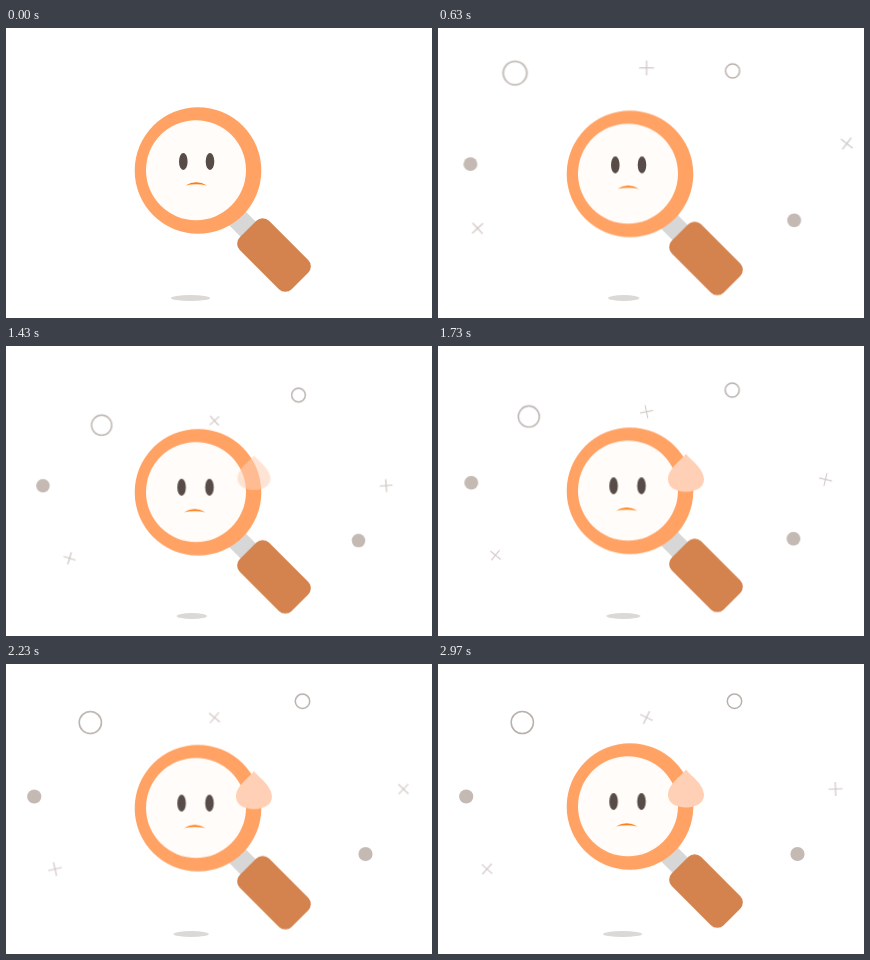
These frames come from a looping animation (426x290 px, 3.01 s). An HTML page:

```html
<!DOCTYPE html>
<html lang="en">
<head>
<meta charset="utf-8">
<title>Nothing found</title>
<style>
  :root { --loop: 3010ms; --smooth: cubic-bezier(.37, 0, .63, 1); }
  html, body { margin: 0; width: 100%; height: 100%; overflow: hidden; background: #fff; }
  svg { display: block; width: 100vw; height: 100vh; }

  /* three bobs per loop */
  .bob, .shadow {
    animation: bob calc(var(--loop) / 6) var(--smooth) infinite alternate;
  }
  .shadow { animation-name: shrink; transform-origin: 184.5px 270px; }
  @keyframes bob { to { transform: translateY(4px); } }
  @keyframes shrink { to { transform: translateX(1.4px) scaleX(.76); } }

  /* scenery bursts out from the floor, overshoots, dips and settles */
  .burst { animation: var(--loop) infinite; animation-timing-function: var(--smooth), linear; }
  .near { animation-name: near, appear; transform-origin: 208px 285px; }
  .far { animation-name: far, appear; transform-origin: 212.5px 286px; }
  @keyframes near {
    0%, 7.3% { transform: scale(0); }
    22.9% { transform: scale(1.1); }
    41% { transform: scale(.9); }
    75.3%, 100% { transform: scale(1); }
  }
  @keyframes far {
    0% { transform: scale(0); animation-timing-function: linear; }
    23.6% { transform: scale(1.1); }
    41% { transform: scale(.948); }
    75.3%, 100% { transform: scale(1); }
  }
  @keyframes appear {
    0%, 11% { opacity: 0; }
    17%, 100% { opacity: 1; }
  }

  .spin { animation: spin var(--loop) linear infinite; }
  .spin.late { animation-name: late; }
  @keyframes spin { to { transform: rotate(var(--turn)); } }
  @keyframes late {
    0%, 32.2% { transform: rotate(0deg); }
    100% { transform: rotate(210deg); }
  }

  /* the face sinks, then the sweat drop shows */
  .sink { animation: sink var(--loop) var(--smooth) infinite; }
  @keyframes sink {
    0%, 20% { transform: none; }
    43%, 100% { transform: translate(var(--dx), var(--dy)); }
  }
  .drop { animation: drop var(--loop) var(--smooth) infinite; transform-origin: 248px 105.5px; }
  @keyframes drop {
    0%, 41% { opacity: 0; transform: scale(.8); }
    53%, 100% { opacity: 1; transform: none; }
  }
</style>
</head>
<body>
<svg viewBox="0 0 426 290">
  <defs>
    <path id="cross" d="M-7 0H7M0-7V7" stroke="#d0c6c3" stroke-width="1.2"/>
  </defs>

  <g class="burst near">
    <circle cx="84.3" cy="58.5" r="11.1" fill="none" stroke="#b9b0ab" stroke-width="1.5"/>
    <g transform="translate(208.5 53.5)"><use href="#cross" class="spin late"/></g>
    <g transform="translate(397.5 125)"><use href="#cross" class="spin" style="--turn:180deg"/></g>
    <g transform="translate(49 205)"><use href="#cross" class="spin" style="--turn:225deg"/></g>
  </g>
  <g class="burst far">
    <circle cx="296.5" cy="37.2" r="7.2" fill="none" stroke="#b9b0ab" stroke-width="1.5"/>
    <circle cx="28.2" cy="132.5" r="7.1" fill="#c4b9b3"/>
    <circle cx="359.5" cy="190" r="7.1" fill="#c4b9b3"/>
  </g>

  <ellipse class="shadow" cx="184.5" cy="270" rx="19.7" ry="3" fill="#dcd8d6"/>

  <g class="bob">
    <g transform="translate(268 227) rotate(45)">
      <rect x="-62" y="-10.7" width="40" height="21.4" fill="#d7d7d7"/>
      <rect x="-36.7" y="-20.7" width="73.4" height="41.4" rx="9" fill="#d4834e"/>
    </g>
    <circle cx="192" cy="142.5" r="63.3" fill="#ffa264"/>
    <circle cx="190" cy="142.2" r="50" fill="#fffcf9"/>

    <g fill="#574c47">
      <ellipse class="sink" style="--dx:-1.7px;--dy:4px" cx="177.3" cy="133.5" rx="4.3" ry="8.4"/>
      <ellipse class="sink" style="--dx:-.5px;--dy:4px" cx="204" cy="133.5" rx="4.3" ry="8.4"/>
    </g>
    <path class="sink" style="--dx:-1.6px;--dy:5px" fill="#ff7b0f"
      d="M179.5 157.5Q190.3 150.8 201 157.5Q190.3 154.8 179.5 157.5Z"/>

    <path class="drop" fill="#ffd0b5"
      d="M248 105.5C252 111 266 120 266 131C266 139 258 143.4 248 143.4C238 143.4 230 139 230 131C230 120 244 111 248 105.5Z"/>
  </g>
</svg>
</body>
</html>
```
